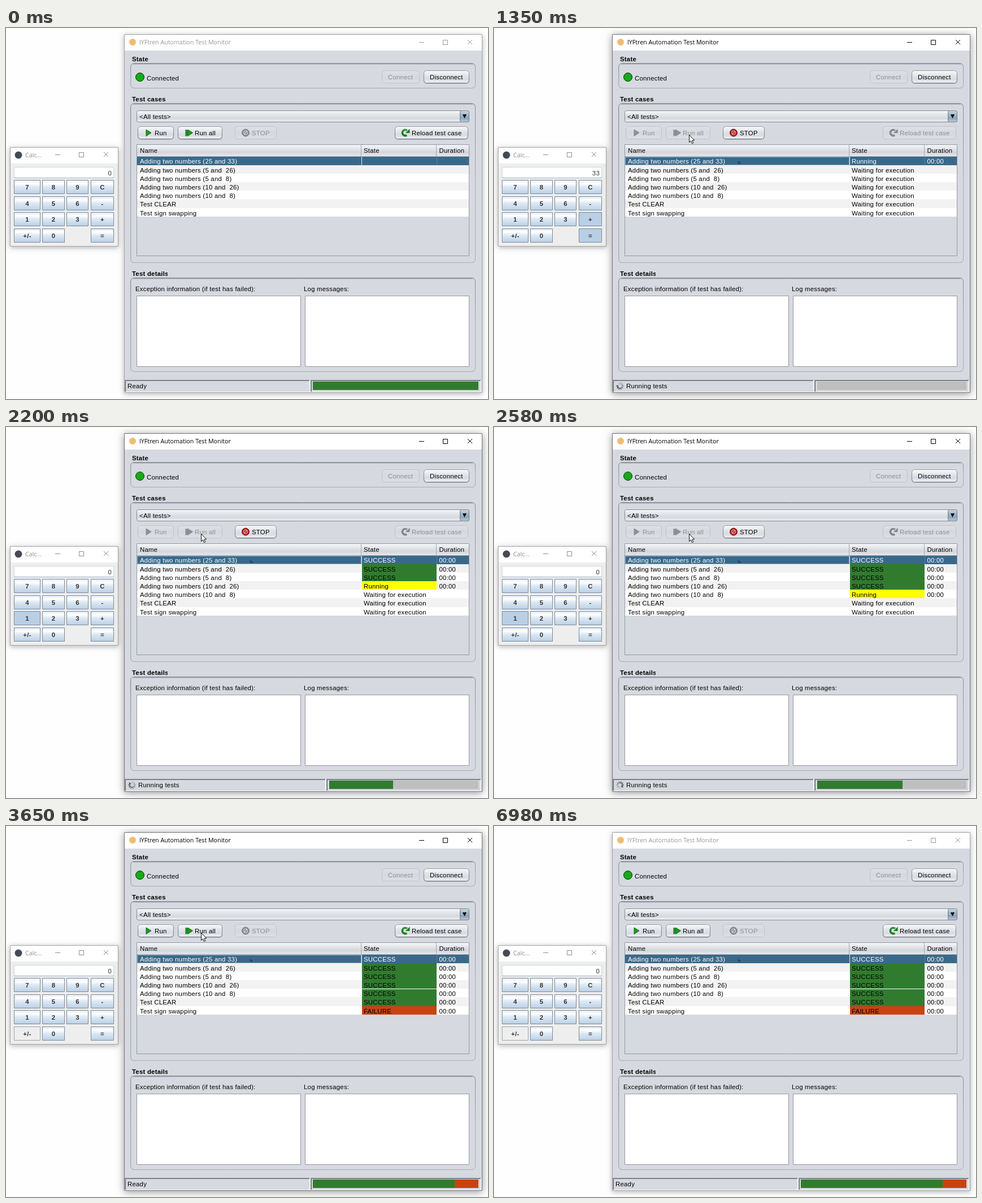
These frames come from a looping animation (853 by 657 pixels, 7.15 s). An HTML page with a canvas:

```html
<!DOCTYPE html>
<html lang="en">
<head>
<meta charset="utf-8">
<title>Test monitor</title>
<style>
html, body { margin: 0; width: 100%; height: 100%; overflow: hidden; background: #fefefe; }
canvas { display: block; }
</style>
</head>
<body>
<canvas id="stage" width="853" height="657"></canvas>
<script>
const c = document.getElementById('stage').getContext('2d');
const LOOP = 7150, BLUR_AT = 6980, STEP = 76.7, CLICK_AT = 888, LAST = 36;
const SANS = '11.4px "Liberation Sans", Arial, sans-serif';
const BOLD = 'bold ' + SANS;
const TITLE = '10.7px "Open Sans", "Noto Sans", sans-serif';
const BG = '#d6d9df', GREEN = '#317b2f', RED = '#c94310', LINE = '#9297a1';

const tests = ['Adding two numbers (25 and 33)', 'Adding two numbers (5 and  26)',
  'Adding two numbers (5 and  8)', 'Adding two numbers (10 and  26)',
  'Adding two numbers (10 and  8)', 'Test CLEAR', 'Test sign swapping'];
const starts = [0, 7, 12, 17, 22, 27, 31, LAST];

// One entry per step: display, then the keys held down (s = sign key)
const calcRun = ('0,|0,2|25,5|25,+|3,3+|33,3+|33,+=|58,=|5,5|5,+|26,6|31,=|0,5|5,+|8,8|13,=|0,|' +
  '0,1|10,0|10,+|26,6|36,=|0,1|10,0|10,+|8,8|18,=|0,|1,1|12,2|0,C|0,|5,5|-5,s|-5,s|5,s').split('|');

const pathIn = [[794, 641], [740, 572], [650, 465], [550, 350], [480, 280], [429, 226], [370, 202], [345, 189]];
const pathOut = [[394, 240], [465, 320], [560, 432], [655, 545], [741, 640]];

function rect(x, y, w, h, fill) {
  c.fillStyle = fill;
  c.fillRect(x, y, w, h);
}

function box(x, y, w, h, fill, stroke, r = 0) {
  c.beginPath();
  c.roundRect(x + .5, y + .5, w - 1, h - 1, r);
  if (fill) { c.fillStyle = fill; c.fill(); }
  if (stroke) { c.strokeStyle = stroke; c.lineWidth = 1; c.stroke(); }
}

function text(s, x, mid, color = '#000', font = SANS, align = 'left') {
  c.font = font;
  c.letterSpacing = font === TITLE ? '0px' : '0.23px';
  c.textAlign = align;
  c.fillStyle = color;
  c.fillText(s, x, mid + 4);
}

function shape(points, fill, stroke) {
  c.beginPath();
  points.forEach(([x, y]) => c.lineTo(x, y));
  c.closePath();
  if (fill) { c.fillStyle = fill; c.fill(); }
  if (stroke) { c.strokeStyle = stroke; c.lineWidth = 1; c.stroke(); }
}

function disc(x, y, r, fill, stroke) {
  c.beginPath();
  c.arc(x, y, r, 0, 7);
  c.fillStyle = fill;
  c.fill();
  if (stroke) { c.strokeStyle = stroke; c.lineWidth = 1; c.stroke(); }
}

function lines(color, width, ...segments) {
  c.strokeStyle = color;
  c.lineWidth = width;
  c.beginPath();
  for (const [x1, y1, x2, y2] of segments) { c.moveTo(x1, y1); c.lineTo(x2, y2); }
  c.stroke();
}

function shade(y, h, ...colors) {
  const g = c.createLinearGradient(0, y, 0, y + h);
  colors.forEach((color, i) => g.addColorStop(i / (colors.length - 1), color));
  return g;
}

function frame(x, y, w, h, active) {
  c.save();
  c.shadowColor = active ? 'rgba(0,0,0,.42)' : 'rgba(0,0,0,.3)';
  c.shadowBlur = active ? 13 : 9;
  c.shadowOffsetY = 2;
  rect(x, y, w, h, '#fff');
  c.restore();
}

function controls(x, y, color) {
  lines(color, 1, [x - 5, y + .5, x + 4, y + .5],
    [x + 81, y - 4, x + 89, y + 4], [x + 81, y + 4, x + 89, y - 4]);
  box(x + 37, y - 4, 9, 9, null, color);
}

function group(title, y, h) {
  text(title, 223, y - 7, '#000', BOLD);
  box(221, y + 1, 610, h - 1, null, '#c3c6cc', 6);
  box(220, y, 611, h, null, shade(y, h, '#898d94', '#a4a8af', '#a8abb2'), 6);
  lines('#999da5', 1, [225, y + 1.5, 826, y + 1.5]);
  lines('#bec1c8', 1, [225, y + 2.5, 826, y + 2.5]);
}

function button(label, x, y, w, textX, on) {
  if (on) {
    box(x, y + 1, w, 23, null, '#b4b8bf', 5);
    box(x, y, w, 23, shade(y, 23, '#fbfbfc', '#e6e8ec', '#d8dbe1', '#f0f2f5'), shade(y, 23, '#989ba1', '#6c7077'), 5);
  } else {
    box(x, y, w, 23, shade(y, 23, '#dfe1e6', '#d5d8de', '#dcdfe4'), '#c0c3c9', 5);
  }
  text(label, textX, y + 12, on ? '#000' : '#8e8f91');
}

function play(x, on) {
  shape([[x, 180], [x + 9, 185.5], [x, 191.5]], on ? '#1c9a22' : '#8d9094', on ? '#136d18' : '#85888c');
}

function reloadIcon(on) {
  const color = on ? '#177c20' : '#85888c';
  c.beginPath();
  c.arc(706.5, 185.5, 5, 5.4, 1, true);
  c.strokeStyle = color;
  c.lineWidth = 3.6;
  c.stroke();
  shape([[707, 186], [714.5, 186], [714.5, 178.5]], color);
  if (on) {
    c.beginPath();
    c.arc(706.5, 185.5, 5, 3.4, 5.2);
    c.strokeStyle = '#48b64e';
    c.lineWidth = 1.2;
    c.stroke();
  }
}

function stopIcon(on) {
  disc(424, 185.5, 6.5, on ? '#b01a1c' : '#85888c', on ? '#7f1012' : '#85888c');
  c.beginPath();
  c.arc(424, 185.5, 3.3, 0, 7);
  c.strokeStyle = on ? '#e0a0a0' : '#cfd2d7';
  c.lineWidth = 1.3;
  c.stroke();
  lines(c.strokeStyle, 1.3, [421.7, 188, 426.3, 183]);
}

function calculator(n) {
  const [display, held] = n >= 0 && n < LAST ? calcRun[n].split(',') : ['0', ''];
  frame(7, 211, 192, 176);
  rect(7, 240, 192, 147, '#eee');
  box(7, 211, 192, 176, null, '#a5a5a5');
  disc(22, 225, 6.5, '#454b55');
  text('Calc...', 34, 225, '#8c8c8c', TITLE);
  controls(92, 224, '#8c8c8c');
  box(14, 246, 177, 20, '#fff', '#c9d5e1');
  lines('#9fb2c6', 1, [14, 265.5, 191, 265.5]);
  text(display, 187, 257, '#333', SANS, 'right');
  const cols = [[14, 47], [64, 40], [107, 39], [150, 41]];
  [...'789C456-123+s0 ='].forEach((key, i) => {
    if (key === ' ') return;
    const [x, w] = cols[i % 4], y = Math.round(269 + 28.5 * (i >> 2));
    const flat = key === 's' && n >= LAST;
    const fill = held.includes(key) ? '#b8cfe5' : flat ? '#eee' :
      shade(y, 25, '#dfe9f2', '#fff', '#dde8f3', '#cbdcec', '#b8cfe5');
    box(x, y, w, 25, fill, flat ? '#98a2ac' : '#7a8a99');
    text(key === 's' ? '+/-' : key, x + w / 2, y + 13, '#333', BOLD, 'center');
  });
}

function table(n, active) {
  const edge = i => Math.floor(228 + 15.17 * i);
  box(231, 206, 589, 198, BG, LINE);
  rect(232, 207, 587, 20, shade(207, 20, '#f5f6f8', '#e4e6ea', '#d3d6dc', '#e6e8ec'));
  lines('#a4a8b0', 1, [232, 227.5, 819, 227.5], [628.5, 207, 628.5, 227], [761.5, 207, 761.5, 227]);
  text('Name', 237, 217);
  text('State', 633, 217);
  text('Duration', 766.5, 217);
  tests.forEach((name, i) => {
    const y = edge(i), h = edge(i + 1) - y, mid = Math.round(236.4 + 15.2 * i);
    const selected = i === 0, ink = selected ? '#fff' : '#000';
    rect(232, y, 587, h, selected ? '#39698a' : i % 2 ? '#f2f2f2' : '#fff');
    if (selected) {
      rect(629, y, 1, h, '#dfe6ec');
      rect(762, y, 1, h, '#54809d');
      if (active) box(232, y, 397, h, null, '#8db3cc');
    }
    text(name, 237, mid, ink);
    if (n < 0) return;
    const state = n < starts[i] ? 'Waiting for execution' : n < starts[i + 1] ? 'Running' :
      i === 6 ? 'FAILURE' : 'SUCCESS';
    const fill = { Running: '#ff0', SUCCESS: GREEN, FAILURE: RED }[state];
    if (fill && !selected) rect(630, y, 132, h, fill);
    text(state, 633, mid, ink);
    if (fill) text('00:00', 766.5, mid, ink);
  });
  if (n >= LAST) rect(630, edge(4), 132, 1, '#fff');
  if (n >= -4) shape([[432, 235], [438, 241], [432, 240]], '#263f63');
}

function sunken(x, w) {
  rect(x, 623, w, 22, '#fff');
  rect(x, 623, w - 1, 21, '#9a9ea5');
  rect(x + 1, 624, w - 2, 20, '#63676e');
  rect(x + 2, 625, w - 3, 19, BG);
}

function statusBar(n, running) {
  const split = running ? 566 : 538;
  sunken(210, split - 210);
  sunken(split + 1, 840 - split);
  const x = running ? 572 : 543, w = 836 - x;
  if (running) {
    const done = starts.filter(s => s > 0 && s <= n).length;
    rect(x, 626, w, 15, '#bfbfbf');
    rect(x, 626, Math.round(w * done / 7), 15, GREEN);
    for (let i = 0; i < 10; i++) {
      const a = (i + n) * Math.PI / 5, dx = Math.cos(a), dy = Math.sin(a);
      lines(`rgba(10,10,10,${.1 + i * .1})`, 1.5, [223 + 3 * dx, 634 + 3 * dy, 223 + 6.5 * dx, 634 + 6.5 * dy]);
    }
    text('Running tests', 234, 634);
  } else {
    rect(x, 626, w, 15, GREEN);
    if (n >= LAST) rect(794, 626, 42, 15, RED);
    text('Ready', 215, 634);
  }
}

function monitor(n, active) {
  const running = n >= 0 && n < LAST;
  const ink = active ? '#000' : '#999';
  frame(209, 11, 634, 635, active);
  rect(209, 40, 634, 606, BG);
  disc(224, 25, 6, '#f0bd70');
  text('lYFtren Automation Test Monitor', 236, 25, ink, TITLE);
  controls(736, 25, ink);

  group('State', 62, 45);
  disc(237, 87, 7.5, '#14ac14', '#0a300a');
  text('Connected', 249, 89);
  button('Connect', 665, 75, 67, 676, false);
  button('Disconnect', 739, 75, 81, 750, true);

  group('Test cases', 133, 283);
  box(231, 146, 589, 21, shade(146, 21, '#fafbfc', '#e4e6ea', '#d6d9df', '#eef0f3'), '#85898f', 3);
  box(803, 146, 17, 21, shade(146, 21, '#d3dee8', '#a5b8c9', '#8fa6b9', '#bdd0df'), '#708396', 3);
  shape([[808, 153], [815, 153], [811.5, 160]], '#000');
  text('<All tests>', 236, 157);
  button('Run', 233, 174, 64, 263, !running);
  play(248, !running);
  button('Run all', 304, 174, 79, 334, !running);
  play(318, !running);
  play(321.5, !running);
  button('STOP', 405, 174, 74, 435, running);
  stopIcon(running);
  button('Reload test case', 688, 174, 130, 718, !running);
  reloadIcon(!running);
  table(n, active);

  c.save();
  c.beginPath();
  c.rect(0, 0, 286, 657);
  c.clip();
  text('Test details', 223, 435, '#000', BOLD);
  c.restore();
  group('', 442, 167);
  text('Exception information (if test has failed):', 229, 462);
  text('Log messages:', 527, 462);
  box(231, 474, 291, 126, '#fff', LINE);
  box(529, 474, 291, 126, '#fff', LINE);

  statusBar(n, running);
  box(209, 11, 634, 635, null, active ? '#74777c' : '#a0a3a8');
}

function pointer(n) {
  const at = n < -1 ? pathIn[n + 9] : n < 61 ? pathIn[7] : pathOut[n - 61];
  if (!at) return;
  c.save();
  c.translate(at[0] + .5, at[1] + .5);
  shape([[0, 0], [0, 13], [3, 10.3], [5, 15], [7.2, 14], [5.2, 9.5], [9.2, 9.3]], '#fff', '#111');
  c.restore();
}

function draw() {
  const t = performance.now() % LOOP;
  const n = Math.floor((t - CLICK_AT) / STEP);
  rect(0, 0, 853, 657, '#fefefe');
  calculator(n);
  monitor(n, n >= 0 && t < BLUR_AT);
  pointer(n);
  requestAnimationFrame(draw);
}
draw();
</script>
</body>
</html>
```
